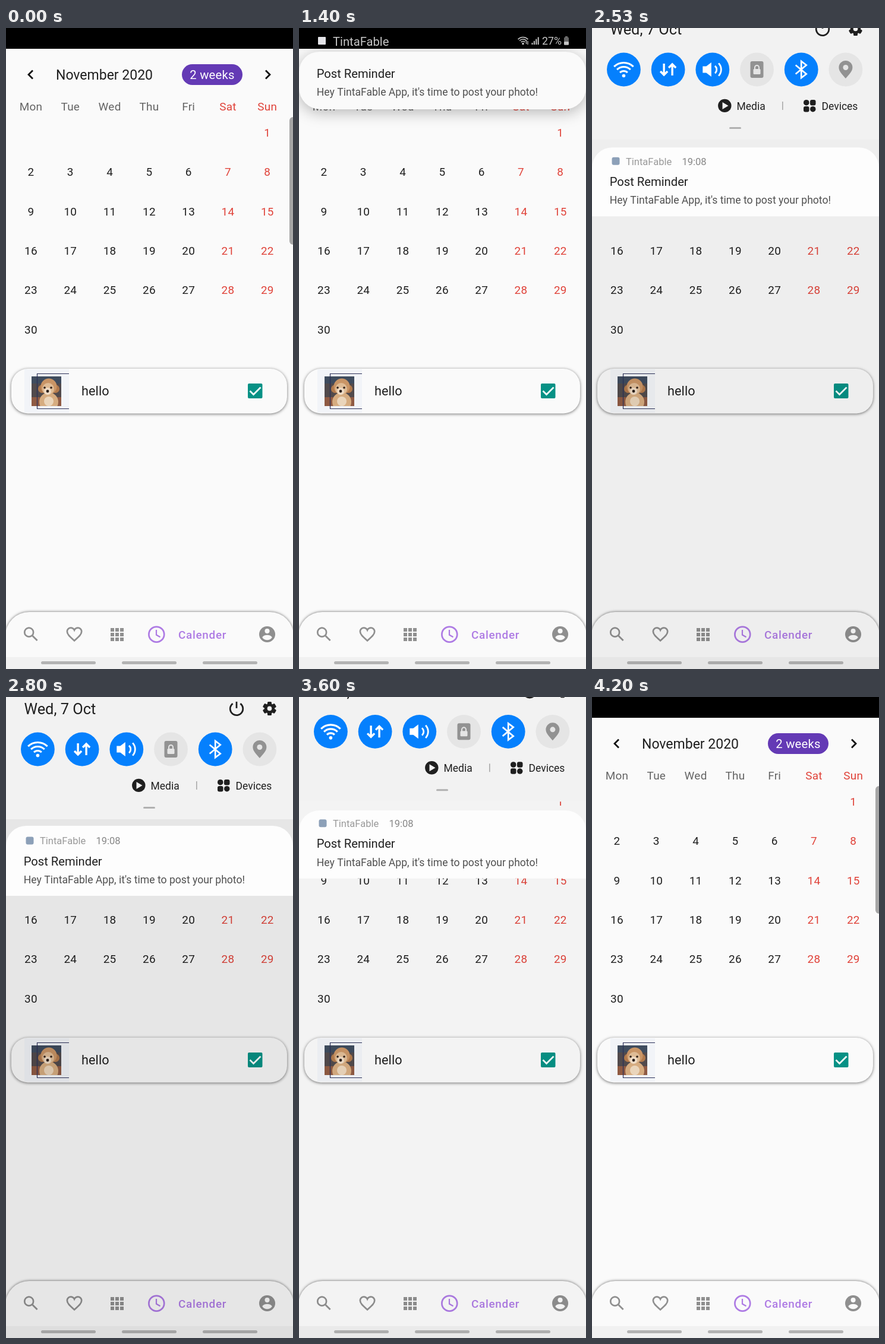
An HTML page with a canvas for the animation above (4.27 s loop, 483 by 1080 pixels).

```html
<!DOCTYPE html>
<html lang="en">
<head>
<meta charset="utf-8">
<title>Calendar reminder</title>
<style>
html, body { margin: 0; width: 100%; height: 100%; overflow: hidden; background: #fafafa; }
canvas { display: block; width: 483px; height: 1080px; }
</style>
</head>
<body>
<canvas id="stage"></canvas>
<script>
const W = 483, H = 1080, LOOP = 4270;
const APP = 'TintaFable';
const PAGE = '#fafafa', INK = '#1f1f1f', RED = '#e0433a', GREY = '#8f8f8f', BLUE = '#0580fd', OFF = '#e5e5e5';

const canvas = document.getElementById('stage');
const ratio = window.devicePixelRatio || 1;
canvas.width = W * ratio;
canvas.height = H * ratio;
const ctx = canvas.getContext('2d');

// Shade travel in px: 0 is fully open, -200 is the resting banner.
const TRAVEL = [
  [680, -310], [1000, -200], [1750, -200], [2200, -104.5], [2530, -18],
  [2850, 0], [3380, 0], [3600, -29], [3800, -120], [4060, -310]
];

const clamp = v => Math.max(0, Math.min(1, v));
const ramp = (t, a, b) => clamp((t - a) / (b - a));

function slope(k, i) {
  if (i === 0 || i === k.length - 1) return 0;
  const before = k[i][1] - k[i - 1][1], after = k[i + 1][1] - k[i][1];
  if (before * after <= 0) return 0;
  return (before + after) / (k[i + 1][0] - k[i - 1][0]);
}

function curve(k, t) {
  if (t <= k[0][0]) return k[0][1];
  for (let i = 0; i < k.length - 1; i++) {
    const [t0, a] = k[i], [t1, b] = k[i + 1];
    if (t > t1) continue;
    const d = t1 - t0, u = (t - t0) / d, v = 1 - u;
    return a * v * v * (1 + 2 * u) + b * u * u * (3 - 2 * u)
      + d * u * v * (slope(k, i) * v - slope(k, i + 1) * u);
  }
  return k[k.length - 1][1];
}

function text(s, x, y, size, color, { align = 'left', weight = 400, gap = 0 } = {}) {
  ctx.font = `${weight} ${size}px Roboto, sans-serif`;
  ctx.letterSpacing = gap + 'px';
  ctx.textAlign = align;
  ctx.fillStyle = color;
  ctx.fillText(s, x, y + size * 0.356);
}

function box(x, y, w, h, r, color) {
  ctx.beginPath();
  ctx.roundRect(x, y, w, h, r);
  ctx.fillStyle = color;
  ctx.fill();
}

function dot(x, y, r, color) {
  ctx.beginPath();
  ctx.arc(x, y, r, 0, Math.PI * 2);
  ctx.fillStyle = color;
  ctx.fill();
}

function arc(x, y, r, from, to, color, width) {
  ctx.beginPath();
  ctx.arc(x, y, r, from * Math.PI, to * Math.PI);
  ctx.strokeStyle = color;
  ctx.lineWidth = width;
  ctx.stroke();
}

function line(d, color, width) {
  ctx.strokeStyle = color;
  ctx.lineWidth = width;
  ctx.stroke(new Path2D(d));
}

function shape(d, color) {
  ctx.fillStyle = color;
  ctx.fill(new Path2D(d));
}

function group(draw, alpha = 1, dx = 0, dy = 0, scale = 1) {
  if (alpha <= 0) return;
  ctx.save();
  ctx.globalAlpha *= alpha;
  ctx.translate(dx, dy);
  ctx.scale(scale, scale);
  draw();
  ctx.restore();
}

function shadow(color, blur, dy) {
  ctx.shadowColor = color;
  ctx.shadowBlur = blur * ratio;
  ctx.shadowOffsetY = dy * ratio;
}

function drawCalendar() {
  line('M45 71.5L38 78.5L45 85.5', '#111', 2.8);
  line('M437 71.5L444 78.5L437 85.5', '#111', 2.8);
  text('November 2020', 84, 78.5, 23, INK);
  box(296, 61, 102, 35, 17.5, '#643ab5');
  text('2 weeks', 347, 78.5, 20.3, '#fff', { align: 'center', gap: 0.2 });

  const opts = { align: 'center', gap: 0.3 };
  const column = i => 42 + i * 66.3;
  ['Mon', 'Tue', 'Wed', 'Thu', 'Fri', 'Sat', 'Sun'].forEach((name, i) =>
    text(name, column(i), 132.5, 18.9, i > 4 ? RED : '#646464', opts));
  for (let day = 1; day <= 30; day++) {
    const cell = day + 5, i = cell % 7;
    text(String(day), column(i), 176.4 + Math.floor(cell / 7) * 66.3, 18.9, i > 4 ? RED : INK, opts);
  }
}

function drawPhoto() {
  const fur = '#c99566', dark = '#2a1d18';
  box(31, 575, 75, 73, 0, '#f2f4f8');
  ctx.save();
  ctx.beginPath();
  ctx.rect(43, 587, 50, 50);
  ctx.clip();
  box(43, 587, 50, 50, 0, '#514a4c');
  box(43, 587, 50, 12, 0, '#3f4c5e');
  box(43, 622, 50, 15, 0, '#8f5a43');
  dot(72, 630, 16, '#d6ac80');
  dot(61, 608, 7, '#b27a4c');
  dot(83, 608, 7, '#b27a4c');
  dot(72, 604, 13.5, fur);
  dot(71, 608, 10, '#dfbc96');
  dot(70, 612, 6, '#efdcc6');
  dot(72, 629, 8, '#ead5bb');
  dot(65, 606, 1.8, dark);
  dot(76, 606, 1.8, dark);
  dot(70, 612, 2.4, dark);
  ctx.restore();
  line('M106 582.5H52.5V641.5H106', '#2c3158', 1.2);
}

function drawTask() {
  group(() => {
    shadow('rgba(0,0,0,.55)', 5, 1);
    box(9, 574, 464, 75.5, 28, PAGE);
  });
  drawPhoto();
  text('hello', 127, 611.5, 21.6, INK, { gap: 0.1 });
  box(407, 599, 24.5, 25, 2, '#069185');
  line('M410.5 611.5L416.5 617.5L428.5 605.5', '#fff', 2.7);
}

function drawNav() {
  group(() => {
    shadow('rgba(0,0,0,.5)', 4, -0.5);
    box(-1, 984, 485, 110, 40, PAGE);
  });
  box(0, 1060, W, 20, 0, '#f1f1f1');
  for (const x of [59, 195, 331]) box(x, 1067, 92, 5, 2.5, '#b3b3b3');

  const icon = (x, draw) => group(draw, 1, x - 16.2, 1005.3, 1.353);
  icon(42, () => {
    arc(9.5, 9.5, 5.5, 0, 2, GREY, 2);
    line('M13.8 13.8L19.8 19.8', GREY, 2.1);
  });
  icon(115, () => line('M12 20C6 14.6 3 12 3 8.5 3 6 5 4 7.5 4 9.5 4 11.2 5.1 12 6.8 12.8 5.1 14.5 4 16.5 4 19 4 21 6 21 8.5 21 12 18 14.6 12 20Z', GREY, 2));
  for (let i = 0; i < 9; i++) box(176 + i % 3 * 8, 1011 + Math.floor(i / 3) * 8, 6, 6, 0, GREY);
  const purple = '#ae7be4';
  arc(253.3, 1021.7, 12.9, 0, 2, purple, 2.7);
  line('M253 1014V1022.5L259.5 1026.3', purple, 2.2);
  text('Calender', 290, 1022, 18.9, purple, { weight: 500, gap: 0.7 });
  icon(439.5, () => {
    dot(12, 12, 10, GREY);
    dot(12, 8, 3, PAGE);
    shape('M6 16C6 14 10 12.9 12 12.9S18 14 18 16C15 20.3 9 20.3 6 16Z', PAGE);
  });
}

function drawStatus() {
  const c = '#c6c6c6';
  box(32, 15, 13, 13, 1, '#e4e4e8');
  text(APP, 57, 22.5, 20.2, c);
  dot(377, 26.5, 1.8, c);
  for (const r of [4.5, 8, 11.5]) arc(377, 27, r, 1.24, 1.76, c, 1.7);
  line('M382.5 21V27M385 22V28', c, 1.3);
  for (let i = 0; i < 4; i++) box(391.5 + i * 3.4, 25 - i * 3.2, 2, 3 + i * 3.2, 0, c);
  text('27%', 409, 22, 17.8, c);
  box(448, 14, 4, 2, 0, '#777');
  box(446, 15.5, 8, 13, 1.5, '#666');
  box(446, 23, 8, 5.5, 1, c);
}

const toggles = [
  c => {
    dot(0, 10.5, 2.8, c);
    for (const r of [9, 16, 23]) arc(0, 11.5, r, 1.25, 1.75, c, 3.2);
  },
  c => line('M-7 -10V8M-13 3L-7 9L-1 3M7 10V-8M1 -3L7 -9L13 -3', c, 3.4),
  c => {
    shape('M-16.5 -5.5H-10.5L-2 -12V12L-10.5 5.5H-16.5Z', c);
    arc(-1, 0, 8, -0.28, 0.28, c, 2.8);
    arc(-1, 0, 15.5, -0.24, 0.24, c, 2.8);
  },
  c => {
    box(-11, -14, 22, 28, 3, c);
    box(-6, -1, 12, 9, 1.5, OFF);
    line('M-3.5 0V-3.5A3.5 3.5 0 0 1 3.5 -3.5V0', OFF, 2);
  },
  c => line('M-9.5 -7.5L8.5 7.5L0 14V-14L8.5 -7.5L-9.5 7.5', c, 2.7),
  c => {
    shape('M0 15C-6 8 -11.5 3 -11.5 -3.5A11.5 11.5 0 0 1 11.5 -3.5C11.5 3 6 8 0 15Z', c);
    dot(0, -3.5, 4.5, OFF);
  }
];

function drawGear(x, y) {
  for (let i = 0; i < 6; i++) {
    ctx.save();
    ctx.translate(x, y);
    ctx.rotate(i * Math.PI / 3);
    box(-3.5, -11.5, 7, 8, 1.5, INK);
    ctx.restore();
  }
  dot(x, y, 8.6, INK);
  dot(x, y, 3.8, '#f2f2f2');
}

function drawHeader() {
  box(0, -400, W, 606, 0, '#f2f2f2');
  text('Wed, 7 Oct', 30.5, 20.5, 25.4, INK);
  arc(388, 20, 10.8, -0.3, 1.3, INK, 2.7);
  line('M388 8V19', INK, 2.7);
  drawGear(443.5, 19.5);
  toggles.forEach((draw, i) => {
    const on = i < 3 || i === 4, x = 53.4 + i * 74.7;
    dot(x, 88.1, 28.4, on ? BLUE : OFF);
    group(() => draw(on ? '#fff' : '#929292'), 1, x, 88.1);
  });
  dot(223.3, 149, 11.2, INK);
  shape('M219.5 143V155L229.5 149Z', '#f2f2f2');
  text('Media', 243.5, 149.5, 17.5, INK);
  box(320, 142, 1.6, 14, 0, '#a8a8a8');
  box(356, 139, 9.5, 9.5, 4.5, INK);
  box(367, 139, 9.5, 9.5, 3, INK);
  box(356, 150, 9.5, 9.5, 3, INK);
  box(367, 150, 9.5, 9.5, 4.75, INK);
  text('Devices', 386.5, 149.5, 17.5, INK);
  box(231, 185, 20, 3, 1.5, '#b0b0b0');
}

function drawNotice(off) {
  const float = clamp((-130 - off) / 70);
  const title = 276.5 + off;
  const top = title - 36.5 - (off + 200) * 0.115;
  const bottom = title + 58.5 + 2 * float;
  const foot = 36 * float;
  const tone = Math.round(250 + 3 * clamp((off + 130) / 100));
  ctx.save();
  ctx.beginPath();
  ctx.rect(0, 35, W, H);
  ctx.clip();
  group(() => {
    shadow(`rgba(0,0,0,${0.28 * float})`, 26, 5);
    box(0, top, W, bottom - top, [34, 34, foot, foot], `rgb(${tone},${tone},${tone})`);
  });
  group(() => {
    box(33.5, title - 41, 13, 13, 3, '#8ca0b8');
    text(APP, 57, title - 34, 16.5, '#999');
    text('19:08', 151.5, title - 34, 16.5, '#868686');
  }, clamp((off + 145) / 95));
  text('Post Reminder', 29.7, title, 20.2, INK);
  text(`Hey ${APP} App, it's time to post your photo!`, 29.7, title + 31.5, 17.6, '#505050');
  ctx.restore();
}

function render(t) {
  const off = curve(TRAVEL, t);
  ctx.setTransform(ratio, 0, 0, ratio, 0, 0);
  box(0, 0, W, H, 0, PAGE);
  drawCalendar();
  drawTask();
  drawNav();
  group(() => box(477, 150, 12, 215, 6, '#a6a6a6'), 1 - ramp(t, 690, 820) + ramp(t, 4060, 4190));

  const dim = Math.max(0, 0.077 + off * 0.0017);
  if (dim) box(0, 0, W, H, 0, `rgba(0,0,0,${dim})`);

  box(0, 0, W, 35, 0, '#000');
  group(drawStatus, ramp(t, 690, 860) - ramp(t, 4000, 4150));
  group(() => drawNotice(off), ramp(t, 680, 800) - ramp(t, 3850, 4030));
  // The header travels slightly further than the card.
  group(drawHeader, clamp((off + 200) / 25), 0, off * 1.015);
}

const start = performance.now();
function tick() {
  render((performance.now() - start) % LOOP);
  requestAnimationFrame(tick);
}
tick();
</script>
</body>
</html>
```
